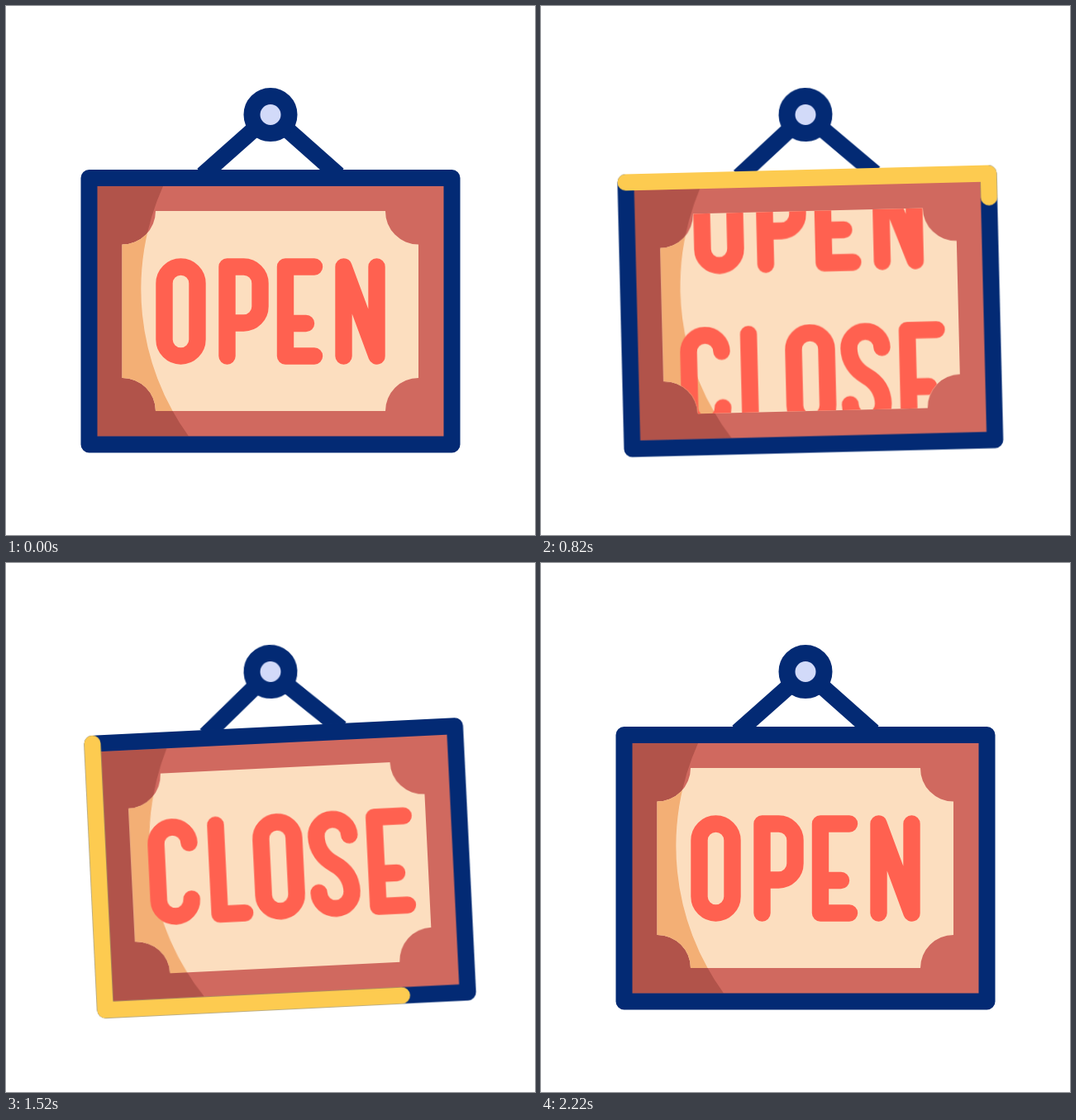
Write an HTML page without scripts that moves like this. It is 640x640 px and loops after 2400 ms.

```html
<!DOCTYPE html>
<html lang="en">
<head>
<meta charset="utf-8">
<title>Shop sign</title>
<style>
html, body { margin: 0; width: 100%; height: 100%; overflow: hidden; background: #fff; }
svg { display: block; width: 100%; height: 100%; }

.navy { fill: none; stroke: #032a74; stroke-width: 20; stroke-linejoin: round; }
.letters { fill: none; stroke: #ff6150; stroke-width: 20.4; stroke-linecap: round; stroke-linejoin: round; }

.sign, .letters, .glow {
  animation: 2400ms cubic-bezier(.3333, 0, .6667, 1) infinite;
}
.sign { transform-box: view-box; transform-origin: 320px 131.5px; animation-name: swing; }
.letters { animation-name: scroll; }
.glow {
  fill: none; stroke: #fdcb50; stroke-width: 20;
  stroke-linecap: round; stroke-linejoin: round;
  stroke-dasharray: 1 3;
  animation-name: run, show;
  animation-timing-function: cubic-bezier(.3333, 0, .6667, 1), step-end;
}

/* wide swings first, then two quick ones */
@keyframes swing {
  0%, 8.3333% { transform: rotate(0deg); }
  25% { transform: rotate(9deg); }
  41.6667% { transform: rotate(-9deg); }
  58.3333% { transform: rotate(9deg); }
  66.6667% { transform: rotate(-9deg); }
  75% { transform: rotate(9deg); }
  83.3333% { transform: rotate(-9deg); }
  91.6667%, 100% { transform: rotate(0deg); }
}
@keyframes scroll {
  0%, 25% { transform: translateY(0); }
  41.6667%, 66.6667% { transform: translateY(-194px); }
  83.3333%, 100% { transform: translateY(0); }
}
/* the line grows round the frame, then its tail follows */
@keyframes run {
  0%, 25% { stroke-dashoffset: 1; }
  50% { stroke-dashoffset: 0; }
  75%, 100% { stroke-dashoffset: -1; }
}
@keyframes show {
  0% { visibility: hidden; }
  25.01% { visibility: visible; }
  75%, 100% { visibility: hidden; }
}
</style>
</head>
<body>
<svg viewBox="0 0 640 640" role="img" aria-label="Hanging sign: OPEN, CLOSE">
  <defs>
    <path id="panel" d="M181 248H459A40 40 0 0 0 499 288.500V450A40 40 0 0 0 459 490H181A40 40 0 0 0 140.500 450V288.500A40.500 40.500 0 0 0 181 248Z"/>
    <path id="shade" d="M100.500 218H190A304 304 0 0 0 221 520.500H100.500Z"/>
    <clipPath id="window"><use href="#panel"/></clipPath>
  </defs>

  <g class="sign">
    <path class="navy" d="M238 204.200L320 131.500L402 204.200"/>
    <circle class="navy" cx="320" cy="131.500" r="22.500" style="fill:#d2daf9"/>

    <rect x="100.500" y="208" width="439" height="322.500" fill="#d0695f"/>
    <use href="#shade" fill="#b1534a"/>
    <use href="#panel" fill="#fcdebf"/>
    <g clip-path="url(#window)">
      <use href="#shade" fill="#f3af75"/>
      <g class="letters">
        <g id="open">
          <rect x="191.500" y="315.500" width="40" height="108" rx="20"/>
          <path d="M267.500 423.500V315.500H287.500a20 20 0 0 1 20 20v28a20 20 0 0 1-20 20H267.500"/>
          <path d="M373 315.500H338V423.500H373M338 384H363"/>
          <path d="M408.500 423.500V315.500L448.500 423.500V315.500"/>
        </g>
        <g id="close" transform="translate(0 192)">
          <path d="M211.500 335.500a20 20 0 0 0-40 0v68a20 20 0 0 0 40 0"/>
          <path d="M244.500 315.500V423.500H275"/>
          <rect x="298.500" y="315.500" width="40" height="108" rx="20"/>
          <path d="M405.500 335.500a20 20 0 0 0-40 0C365.500 351 374 362.500 385.500 369.500S405.500 387.500 405.500 403.500a20 20 0 0 1-40 0"/>
          <path d="M472 315.500H436.500V423.500H472M436.500 384H461"/>
        </g>
      </g>
    </g>

    <rect class="navy" x="100.500" y="208" width="439" height="322.500"/>
    <path class="glow" pathLength="1" d="M100.500 208H539.500V530.500H100.500V208"/>
  </g>
</svg>
</body>
</html>
```
